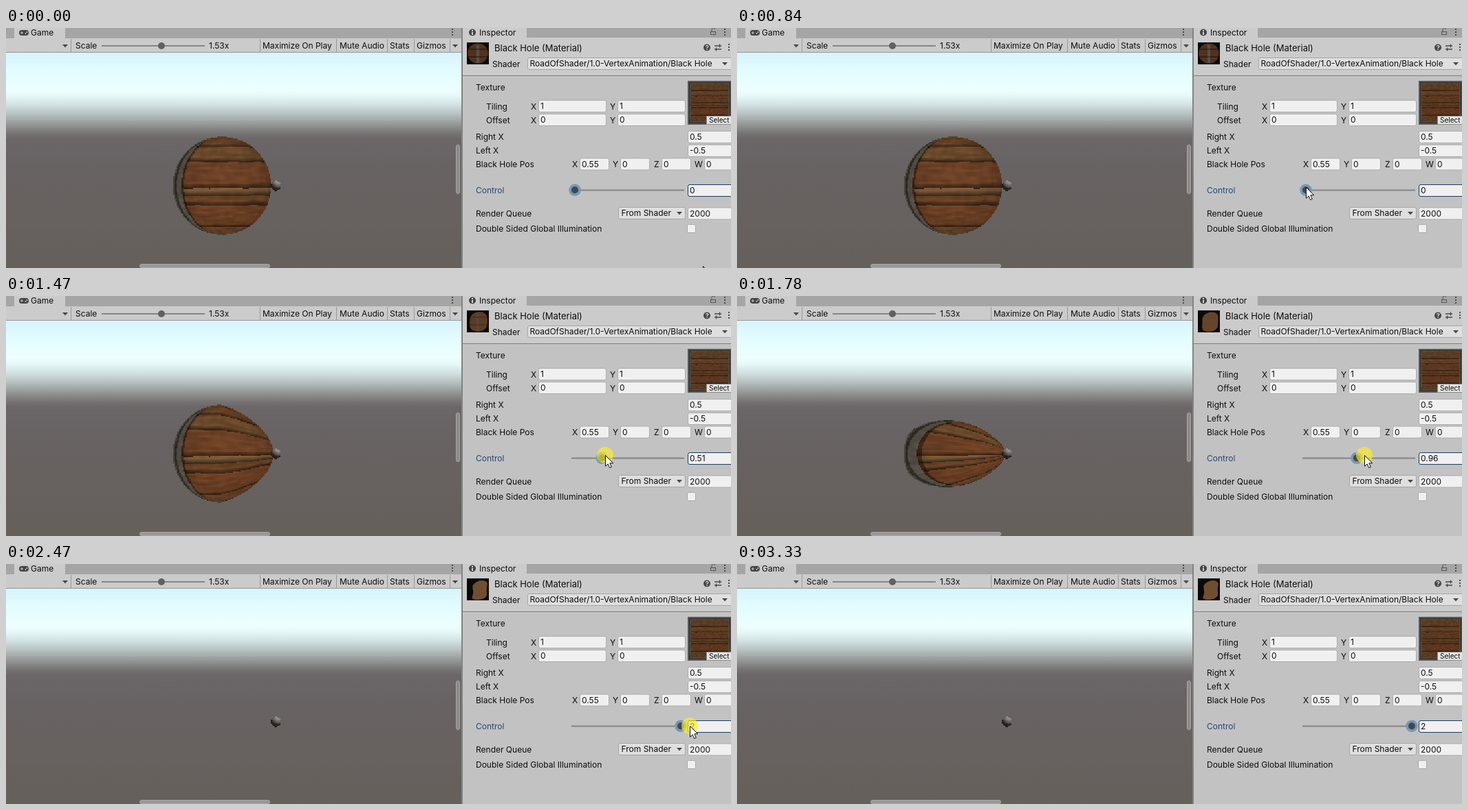
An HTML page with a canvas that plays this animation: 1054x350 px, repeating every 3.79 s.

```html
<!DOCTYPE html>
<html lang="en">
<head>
<meta charset="utf-8">
<title>Black hole material</title>
<style>
  html, body { margin: 0; width: 100%; height: 100%; overflow: hidden; background: #c2c2c2; }
  svg, canvas { position: absolute; left: 0; top: 0; }
  text { font: 12px Inter, sans-serif; fill: #0c0c0c; white-space: pre; }
  canvas { image-rendering: pixelated; }
</style>
</head>
<body>
<svg id="stage" width="1054" height="350" viewBox="0 0 1054 350">
  <defs>
    <linearGradient id="sky" x1="0" y1="36" x2="0" y2="350" gradientUnits="userSpaceOnUse">
      <stop offset="0" stop-color="#d6f4fb"/>
      <stop offset=".08" stop-color="#e2fcff"/>
      <stop offset=".17" stop-color="#edffff"/>
      <stop offset=".2" stop-color="#e6f8f8"/>
      <stop offset=".24" stop-color="#d3e3e3"/>
      <stop offset=".29" stop-color="#b3bdbc"/>
      <stop offset=".335" stop-color="#939594"/>
      <stop offset=".37" stop-color="#7a7777"/>
      <stop offset=".4" stop-color="#6b6667"/>
      <stop offset=".5" stop-color="#686364"/>
      <stop offset="1" stop-color="#66605b"/>
    </linearGradient>
  </defs>
  <g id="ui"></g>
</svg>
<canvas id="inset" width="60" height="60" style="left:993px;top:79px"></canvas>
<canvas id="ball" width="106" height="98" style="left:240px;top:155px;width:162.18px;height:149.94px"></canvas>
<svg width="1054" height="350" viewBox="0 0 1054 350">
  <rect x="1018.5" y="128.5" width="40" height="12" fill="#e4e4e4" stroke="#8c8c8c"/>
  <text x="1022" y="138" style="font-size:10px">Select</text>
  <g id="knob">
    <circle r="8.8" fill="#7598b9"/>
    <circle r="5" fill="#454749"/>
  </g>
  <circle id="halo" fill="#fff01e" fill-opacity=".64"/>
  <path id="cursor" d="M.5 .5V16.3L4.1 12.9 6.7 18.6 9.3 17.4 6.8 11.8H11.8Z" fill="#fff" stroke="#111"/>
</svg>
<script>
const LOOP = 3790, STEP = LOOP / 49;
const PIXEL = 1.53, UNIT = 143, CENTER = [314, 230], HOLE_X = 0.55;
const $ = id => document.getElementById(id);

// ---------- static interface ----------
const rect = (x, y, w, h, fill, extra = '') =>
  `<rect x="${x}" y="${y}" width="${w}" height="${h}" fill="${fill}" ${extra}/>`;
const label = (x, y, s, extra = '') => `<text x="${x}" y="${y}" ${extra}>${s}</text>`;
const disc = (x, y, r, fill) => `<circle cx="${x}" cy="${y}" r="${r}" fill="${fill}"/>`;
const stroke = (d, color = '#4a4a4a', w = 1) =>
  `<path d="${d}" fill="none" stroke="${color}" stroke-width="${w}"/>`;
const arrow = (x, y) => `<path d="M${x - 4} ${y - 2}h8l-4 4.5z" fill="#484848"/>`;
const dots = (x, y) => [-4, 0, 4].map(d => rect(x - 1, y + d - 1, 2, 2, '#484848')).join('');
const box = (x, y, w, fill, edge) =>
  rect(x + .5, y + .5, w - 1, 17, fill, `rx="2.5" stroke="${edge}"`);
const field = (x, y, w, value, id = '') =>
  box(x, y, w, '#f0f0f0', id ? '#1f3a60' : '#adadad') +
  label(x + 3, y + 13.3, value, id && `id="${id}"`);

function gamePanel() {
  return rect(0, 0, 662, 36, '#a5a5a5') + rect(12, 0, 74, 16, '#cbcbcb') +
    rect(0, 15, 662, 20, '#cbcbcb') + rect(0, 35, 662, 1, '#969696') +
    rect(19, 3, 14, 8, '#444', 'rx="4"') +
    stroke('M21 7h4M23 5v4', '#cbcbcb') + disc(28.5, 8, 1, '#cbcbcb') + disc(30.5, 6, 1, '#cbcbcb') +
    label(36, 10.5, 'Game') + dots(649, 6) + arrow(86, 26) +
    [94, 369, 480, 554, 593, 645].map(x => rect(x, 16, 1, 19, '#999')).join('') +
    label(101, 30.3, 'Scale') + rect(139, 25, 150, 2, '#858585') + disc(226, 26, 5, '#606060') +
    label(295, 30.3, '1.53x') + label(373, 30.3, 'Maximize On Play') +
    label(485, 30.3, 'Mute Audio') + label(558, 30.3, 'Stats') +
    label(597, 30.3, 'Gizmos') + arrow(653, 26) +
    rect(0, 36, 662, 314, 'url(#sky)') +
    rect(194.5, 344.5, 189, 5, '#999797', 'rx="2.5" stroke="#aaa7a6"') +
    rect(654.5, 170.5, 5, 71, '#8d8a8a', 'rx="2.5" stroke="#aaa7a6"') +
    rect(662, 0, 2, 350, '#838383');
}

function inspectorHeader() {
  return rect(664, 0, 390, 350, '#c2c2c2') + rect(664, 0, 390, 14, '#a5a5a5') +
    rect(664, 0, 93, 15, '#cbcbcb') + rect(664, 14, 390, 55, '#cbcbcb') +
    rect(664, 69, 390, 1, '#7f7f7f') +
    disc(678, 6.5, 5, '#444') + rect(677, 6, 2, 4, '#d5d5d5') + rect(677, 3, 2, 2, '#d5d5d5') +
    label(688, 10.5, 'Inspector') +
    rect(1024.5, 5.5, 7, 4, 'none', 'stroke="#555"') + stroke('M1026 5V2a2.2 2.2 0 0 1 4.4 0', '#555') +
    dots(1045, 6) + rect(670, 21, 32, 32, '#0b0908') + '<path id="thumb"/><g id="bands">' +
    rect(684, 25, 4, 26, '#53524d') +
    stroke('M673 31h26M672 42h28', 'rgba(20,10,4,.55)', 1.5) + '</g>' +
    label(710, 34, 'Black Hole (Material)', 'style="font-size:13px"') +
    disc(1019, 28.5, 5, '#484848') +
    label(1016.8, 32, '?', 'style="font-size:9px;font-weight:700;fill:#ddd"') +
    stroke('M1030 26h10M1030 31h10M1037.5 23.5v5M1032.5 28.5v5', '#484848', 1.3) + dots(1051, 28) +
    label(707, 56.5, 'Shader') + box(758, 43, 300, '#dfdfdf', '#a6a6a6') +
    label(761.5, 56.3, 'RoadOfShader/1.0-VertexAnimation/Black Hole') + arrow(1045, 52);
}

function inspectorBody() {
  const tilingRow = (y, name, value) => label(698, y + 13.5, name) +
    label(763, y + 13.5, 'X') + field(774, y, 99, value) +
    label(878, y + 13.5, 'Y') + field(889, y, 99, value);
  const axes = [['X', 823, 834, '0.55'], ['Y', 882, 893, '0'], ['Z', 942, 953, '0'], ['W', 1001, 1015, '0']];
  return label(683, 91, 'Texture') + tilingRow(105, 'Tiling', '1') + tilingRow(125, 'Offset', '0') +
    rect(991, 77, 63, 64, '#5b5b5b') +
    label(683, 163, 'Right X') + field(991, 150, 70, '0.5') +
    label(683, 183, 'Left X') + field(991, 170, 70, '-0.5') +
    label(683, 203, 'Black Hole Pos') +
    axes.map(([name, lx, fx, v]) => label(lx, 203, name) + field(fx, 189.5, 43, v)).join('') +
    label(683, 241.3, 'Control', 'style="fill:#234a74"') +
    rect(822, 235.5, 164, 2, '#838383') + field(991, 228, 70, '0', 'value') +
    label(683, 275, 'Render Queue') + box(890, 261, 98, '#dfdfdf', '#a6a6a6') +
    label(894.5, 274.3, 'From Shader') + arrow(979, 270) + field(991, 261.5, 70, '2000') +
    label(683, 297, 'Double Sided Global Illumination') +
    rect(990.5, 286.5, 12, 12, '#f0f0f0', 'rx="2" stroke="#a8a8a8"');
}

// ---------- wood texture ----------
const PLANKS = [ // lower edge, red, green, blue
  [.22, 108, 68, 38], [.345, 110, 75, 44], [.52, 108, 65, 37], [.57, 124, 89, 55],
  [.635, 106, 67, 38], [.82, 108, 64, 36], [1.02, 102, 67, 40]];

const hash = (x, y) => {
  const s = Math.sin(x * 127.1 + y * 311.7) * 43758.5453;
  return s - Math.floor(s);
};
const mix = (a, b, f) => a + (b - a) * f;
function noise(x, y) {
  const i = Math.floor(x), j = Math.floor(y), f = x - i, g = y - j;
  return mix(mix(hash(i, j), hash(i + 1, j), f), mix(hash(i, j + 1), hash(i + 1, j + 1), f), g);
}
function wood(u, v) {
  const grain = .8 + .25 * noise(u * 22, v * 60) + .16 * noise(u * 60, v * 24);
  const edge = Math.min(u, 1 - u, v, 1 - v);
  if (edge < .045) {
    const k = grain * (edge < .012 ? .6 : 1);
    return [90 * k, 84 * k, 74 * k];
  }
  const row = v + .01 * noise(u * 25, v * 8);
  const plank = PLANKS.find(p => row < p[0]);
  const gap = Math.max(0, 1 - (plank[0] - row) / .035);
  const shade = grain * (1 - .55 * gap) * (edge < .058 ? .6 : 1);
  return plank.slice(1).map(c => c * shade);
}
function paint(canvas, colorAt) {
  const ctx = canvas.getContext('2d'), { width, height } = canvas;
  const image = ctx.createImageData(width, height);
  for (let y = 0, i = 0; y < height; y++)
    for (let x = 0; x < width; x++, i += 4) {
      const c = colorAt(x + .5, y + .5);
      if (c) image.data.set([...c, 255], i);
    }
  ctx.putImageData(image, 0, 0);
}

// ---------- sphere pulled into the hole ----------
// Each point moves toward the hole by pull = control - 0.5 + x; this solves for the rest position.
function sphereColor(px, py, control) {
  if (px > HOLE_X) return null;
  const a = control - .5;
  let x = px, pull = 0;
  if (px > -a) {
    const b = 1 + HOLE_X - a, root = b * b - 4 * (px - HOLE_X * a);
    if (root < 0) return null;
    x = (b - Math.sqrt(root)) / 2;
    pull = a + x;
  }
  if (pull >= 1) return null;
  const y = py / (1 - pull), zz = .25 - x * x - y * y;
  if (zz < 0) return null;
  const z = Math.sqrt(zz);
  const u = (Math.atan2(x, z) + 1.25) / (2 * Math.PI);
  const light = .78 + .5 * z;
  return wood((u + 1) % 1, .5 + Math.asin(2 * y) / Math.PI).map(c => c * light);
}
function holeColor(px, py) {
  const x = (px - HOLE_X) / .05, y = py / .05, zz = 1 - x * x - y * y;
  if (zz < 0) return null;
  const d = Math.max(0, x * .35 - y * .75 + Math.sqrt(zz) * .45);
  return [40 + 118 * d, 30 + 126 * d, 27 + 128 * d];
}
function drawBall(control) {
  paint($('ball'), (cx, cy) => {
    const x = (240 + cx * PIXEL - CENTER[0]) / UNIT, y = (155 + cy * PIXEL - CENTER[1]) / UNIT;
    return holeColor(x, y) || sphereColor(x, y, control);
  });
}

// ---------- preview thumbnail ----------
const BLOB = [[690, 23], [701, 26], [698, 37], [700, 48], [688, 53], [676, 51], [680, 42], [677, 30]];
function drawThumb(control) {
  const f = Math.min(1, control * .7);
  const pts = BLOB.map(([x, y], i) => {
    const a = i * Math.PI / 4;
    return [mix(686 + 16 * Math.sin(a), x, f), mix(37 - 16 * Math.cos(a), y, f)];
  });
  const mid = i => pts[i].map((c, n) => (c + pts[(i + 1) % 8][n]) / 2);
  $('thumb').setAttribute('d', `M${mid(7)}` + pts.map((p, i) => `Q${p} ${mid(i)}`).join('') + 'Z');
  $('thumb').setAttribute('fill', `rgb(${mix(80, 112, f)},${mix(50, 78, f)},${mix(30, 48, f)})`);
  $('bands').setAttribute('opacity', Math.max(0, 1 - control));
}

// ---------- timeline, in steps ----------
const CONTROL = [[14, 0], [15, .06], [17, .24], [19, .51], [21, .83], [23, .96], [26, 1.38], [28, 1.72], [32, 2]];
const POINTER = [[0, 1013, 347], [1, 1003, 338], [4, 915, 283], [6, 842, 243], [7, 830, 235], [8, 827, 233],
  [11, 827, 232], [14, 827, 232], [15, 833, 232], [19, 871, 232], [23, 912, 232], [26, 943, 233],
  [28, 969, 234], [32, 994, 236], [38, 994, 236], [40, 1010, 264], [42, 1038, 325], [43, 1054, 360]];
const HALO = [[11, 0], [12, 8], [13, 12], [36, 12], [37, 7], [38, 0]];

function at(keys, k) {
  const next = keys.findIndex(key => key[0] > k);
  if (next === 0) return keys[0].slice(1);
  if (next < 0) return keys[keys.length - 1].slice(1);
  const a = keys[next - 1], b = keys[next], f = (k - a[0]) / (b[0] - a[0]);
  return a.slice(1).map((v, i) => mix(v, b[i + 1], f));
}

let shown = -1, drawnControl = -1;
function render(time) {
  const k = Math.min(48, Math.floor((time % LOOP) / STEP + .16));
  if (k === shown) return;
  shown = k;
  const [control] = at(CONTROL, k), [x, y] = at(POINTER, k);
  if (control !== drawnControl) {
    drawnControl = control;
    drawBall(control);
    drawThumb(control);
    $('value').textContent = +control.toFixed(2);
    $('knob').setAttribute('transform', `translate(${827 + 77 * control} 236.3)`);
  }
  $('cursor').setAttribute('transform', `translate(${x} ${y})`);
  $('halo').setAttribute('cx', x);
  $('halo').setAttribute('cy', y);
  $('halo').setAttribute('r', at(HALO, k)[0]);
}

$('ui').innerHTML = gamePanel() + inspectorHeader() + inspectorBody();
paint($('inset'), (x, y) => wood(x / 60, y / 60).map(c => c * .85));

const start = performance.now();
function tick() {
  render(performance.now() - start);
  requestAnimationFrame(tick);
}
tick();
</script>
</body>
</html>
```
